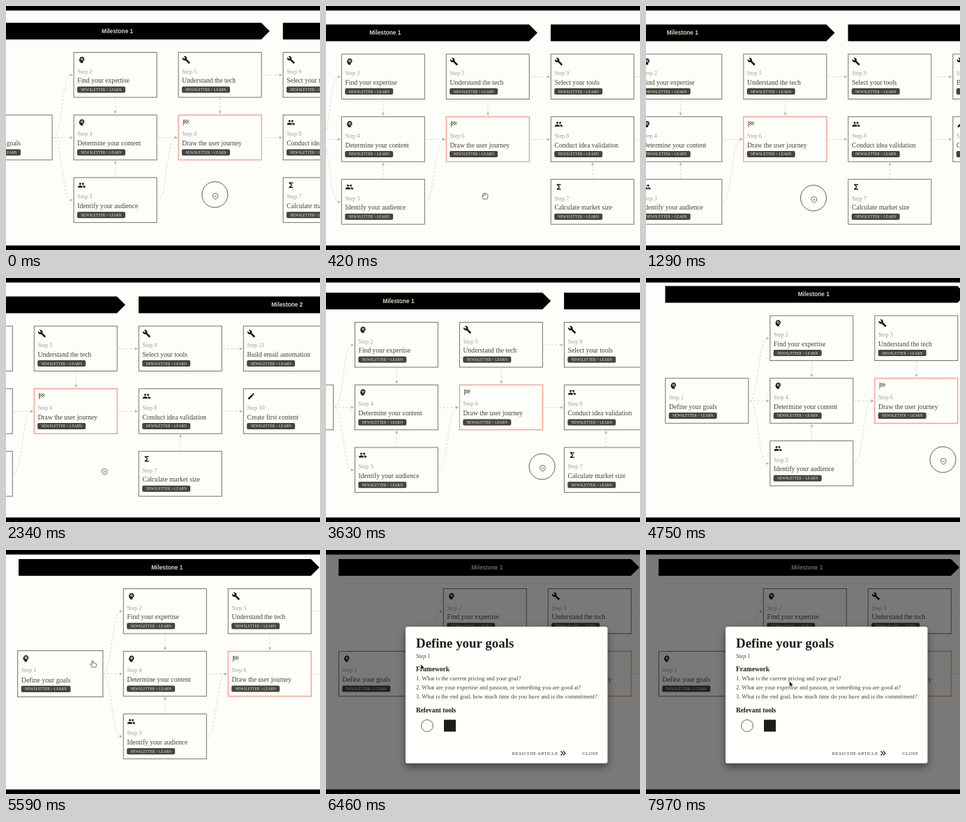
Animation of 450 by 350 pixels, one loop 8000 ms. Source, as an HTML page:

```html
<!DOCTYPE html>
<html lang="en">
<head>
<meta charset="utf-8">
<title>Roadmap</title>
<style>
  html, body { margin: 0; width: 100%; height: 100%; overflow: hidden; background: #fdfdf9; }
  svg { display: block; width: 450px; height: 350px; }
  text { font-family: "Liberation Serif", "Times New Roman", serif; fill: #44443c; white-space: pre; }
  .sans { font: bold 8.3px "Liberation Sans", Arial, sans-serif; fill: #d6d6cc; text-anchor: middle; }
  .step { font-size: 8.3px; fill: #a0a092; }
  .name { font-size: 9.6px; }
  .tag { font-size: 5.35px; fill: #e6e6de; }
  .bold { font-weight: bold; font-size: 9.5px; fill: #1c1c18; }
  .title { font-size: 18.9px; }
  .sub { font-size: 8.3px; font-style: italic; }
  .list { font-size: 8.42px; }
  .action { font-size: 7.15px; }
  .edge { fill: none; stroke: #cfcfba; stroke-width: .8; stroke-dasharray: 3 2.5; }
  .head { fill: #b8b8a0; }
  .line { fill: none; stroke: #1c1c18; }
  .sheet { fill: #fffffc; filter: drop-shadow(0 5px 6px rgba(0, 0, 0, .45)); }
  .hand { fill: #fdfdf9; stroke: #4a4a44; stroke-width: .8; stroke-linejoin: round; }
</style>
</head>
<body>
<svg id="stage" viewBox="0 0 450 350"></svg>
<script>
const DURATION = 8000;
const PAPER = '#fdfdf9', INK = '#1c1c18';

const shape = (d, fill = INK) => `<path d="${d}" fill="${fill}"/>`;
const label = (cls, x, y, s) => `<text class="${cls}" x="${x}" y="${y}">${s}</text>`;

// Icons on a 24 unit grid
const icons = {
  mind: shape('M13 3C9.2 3 6.2 6 6 9.7l-1.9 2.5c-.3.3 0 .8.4.8H6v3c0 1.1.9 2 2 2h1v3h7v-4.7c2.4-1.1 4-3.5 4-6.3 0-3.9-3.1-7-7-7z') +
    `<circle cx="13" cy="10" r="2.7" fill="none" stroke="${PAPER}" stroke-width="2"/>`,
  wrench: shape('M22.7 19l-9.1-9.1c.9-2.3.4-5-1.5-6.9-2-2-5-2.4-7.4-1.3L9 6 6 9 1.6 4.7C.4 7.1.9 10.1 2.9 12.1c1.9 1.9 4.6 2.4 6.9 1.5l9.1 9.1c.4.4 1 .4 1.4 0l2.3-2.3c.5-.4.5-1.1.1-1.4z'),
  people: shape('M16 11a3 3 0 1 0 0-6 3 3 0 0 0 0 6zM8 11a3 3 0 1 0 0-6 3 3 0 0 0 0 6zM8 13c-2.3 0-7 1.2-7 3.5V19h14v-2.5c0-2.3-4.7-3.5-7-3.5zM16 13l-1 .1c1.2.8 2 1.9 2 3.4V19h6v-2.5c0-2.3-4.7-3.5-7-3.5z'),
  sum: shape('M18 4H6v2l6.5 6L6 18v2h12v-3h-7l5-5-5-5h7z'),
  pencil: shape('M3 17.25V21h3.75L17.8 9.9l-3.7-3.7zM20.7 7c.4-.4.4-1 0-1.4l-2.3-2.3c-.4-.4-1-.4-1.4 0l-1.9 1.8 3.8 3.8z'),
  flag: shape('M3 4h1.6v17H3zM5 5h3v3H5zM12 5h3v3h-3zM8 8h4v3H8zM15 8h4v3h-4zM5 11h3v3H5zM12 11h3v3h-3z', '#55554e') +
    '<path d="M4 4.5h15.5v10H4" fill="none" stroke="#88887e"/>'
};

const cards = [
  [1, 0, 1, 'mind', 'Define your goals'],
  [2, 1, 0, 'mind', 'Find your expertise'],
  [4, 1, 1, 'mind', 'Determine your content'],
  [3, 1, 2, 'people', 'Identify your audience'],
  [5, 2, 0, 'wrench', 'Understand the tech'],
  [6, 2, 1, 'flag', 'Draw the user journey'],
  [9, 3, 0, 'wrench', 'Select your tools'],
  [8, 3, 1, 'people', 'Conduct idea validation'],
  [7, 3, 2, 'sum', 'Calculate market size'],
  [11, 4, 0, 'wrench', 'Build email automation'],
  [10, 4, 1, 'pencil', 'Create first content']
];
const colX = col => 18 + 150 * col;
const rowY = row => 55 + 89.8 * row;

function card([step, col, row, icon, name]) {
  return `<g transform="translate(${colX(col)} ${rowY(row)})"><g id="card${step}">
    <rect x=".3" y=".5" width="119" height="64.5" fill="${PAPER}" stroke="${step === 6 ? '#f4806a' : '#74746c'}"/>
    <g transform="translate(5.5 5.3) scale(.5)">${icons[icon]}</g>
    ${label('step', 5.5, 30.6, 'Step ' + step)}
    ${label('name', 5.5, 44.4, name)}
    <rect x="5.2" y="49.6" width="69" height="9" rx="2" fill="#45453e"/>
    ${label('tag', 10.4, 56, 'NEWSLETTER &gt; LEARN')}
  </g></g>`;
}

// Edge between neighbouring columns
function across(col, from, to) {
  const x = colX(col) + 121, end = colX(col + 1) - 4;
  const a = rowY(from) + 33, b = rowY(to) + 33, mid = (x + end) / 2;
  return `<path class="edge" d="M${x} ${a}C${mid} ${a} ${mid} ${b} ${end} ${b}"/>
    <path class="head" d="M${end - 1} ${b - 2}l4 2-4 2z"/>`;
}

// Edge between neighbouring rows
function along(col, from, to) {
  const x = colX(col) + 60, dir = to > from ? 1 : -1;
  const a = rowY(from) + (dir > 0 ? 66 : 0), b = rowY(to) + (dir > 0 ? -4 : 69);
  return `<path class="edge" d="M${x} ${a}V${b}"/>
    <path class="head" d="M${x - 2} ${b - dir}l2 ${4 * dir} 2 ${-4 * dir}z"/>`;
}

const milestone = n => {
  const x = colX(3 * (n - 1));
  return `<path d="M${x} 13h419l12 12-12 12H${x}z"/>` + label('sans', x + 212.8, 27.7, 'Milestone ' + n);
};

const edges = [
  across(0, 1, 0), across(0, 1, 1), across(0, 1, 2),
  across(1, 1, 1), across(1, 2, 1),
  across(2, 0, 0), across(2, 1, 1), across(3, 0, 0), across(3, 1, 1),
  along(1, 0, 1), along(1, 2, 1), along(2, 0, 1), along(3, 2, 1)
];

const questions = [
  'What is the current pricing and your goal?',
  'What are your expertise and passion, or something you are good at?',
  'What is the end goal, how much time do you have and is the commitment?'
];

const modal = `
  <rect class="sheet" x="114" y="110" width="289.5" height="196" rx="3"/>
  ${label('bold title', 129, 139.5, 'Define your goals')}
  ${label('sub', 129, 155, 'Step 1')}
  ${label('bold', 129, 174, 'Framework')}
  ${questions.map((q, i) => label('list', 129, 187 + 13.2 * i, `${i + 1}. ${q}`)).join('')}
  ${label('bold', 129, 233, 'Relevant tools')}
  <circle cx="145" cy="252" r="8.5" fill="#fffffc" stroke="#55554c" stroke-width=".9"/>
  <rect x="169" y="243.5" width="17" height="17" fill="${INK}"/>
  ${label('action', 266.5, 294, 'READ THE ARTICLE')}
  <path class="line" stroke-width="1.2" d="M336.5 288.5l3 3-3 3m3.5-6l3 3-3 3"/>
  ${label('action', 367.5, 294, 'CLOSE')}`;

const cursors = `
  <g id="closed" class="hand"><path d="M-3.5 1.5C-4.5-.5-3-1-2.5-.5-3-3-.8-3.2-.5-2.2 0-3.5 1.5-3.2 1.7-2 3-2.7 4.3-1.5 4 .5 4 4 2.5 5.5.5 5.5S-2.5 4-3.5 1.5z"/><path d="M-.5.5v2M1.3.5v2"/></g>
  <g id="open" class="hand"><path d="M-2.5 5.5C-3.5 4-5 2-4.5 1.2S-3 .8-2.6 1.8L-3.2-1.5c0-1.2 1.3-1.2 1.6-.2C-1.7-3.5 0-3.5.2-2.2.5-3.4 2-3 2.1-1.7 3.5-2.3 4.3-1.3 4 .5c0 2-.5 3.5-1.2 5z"/><path d="M-1.2-1v1.5M.5-1.5v2"/></g>
  <g id="pointer" class="hand"><path d="M-2 8C-3 6-4.5 4.5-4 3.8s1.6 0 2.2.8V-.5c0-1.3 1.7-1.3 1.7 0V2.3C.3 1.7 1.5 1.8 1.7 2.6c.7-.5 1.6-.2 1.8.5.8-.2 1.5.3 1.4 1.2C4.9 6 4.3 7 4 8z"/></g>
  <g id="arrow"><path d="M0 0v8l1.9-1.7 1.4 3 1.3-.6-1.4-2.9h2.5z" fill="#111" stroke="#fffffc" stroke-width=".5"/></g>`;

const $ = id => document.getElementById(id);
$('stage').innerHTML = `
  <rect width="450" height="350" fill="${PAPER}"/>
  <g id="board">${edges.join('')}${milestone(1)}${milestone(2)}${cards.map(card).join('')}</g>
  <rect id="shade" y="6" width="450" height="338"/>
  <path d="M0 0h450v6.5H0zM0 343.5h450v6.5H0z"/>
  <g id="modal">${modal}</g>
  <circle id="press" fill="none" stroke="#5c5c55"/>
  <g id="cursor">${cursors}</g>`;

const el = Object.fromEntries(['board', 'card1', 'shade', 'modal', 'press', 'cursor', 'closed', 'open', 'pointer', 'arrow']
  .map(id => [id, $(id)]));

const clamp = v => Math.min(1, Math.max(0, v));
const ramp = (t, a, b) => { const u = clamp((t - a) / (b - a)); return u * u * (3 - 2 * u); };
const pulse = (t, a, b, fade = 90) => ramp(t, a, a + fade) * (1 - ramp(t, b, b + fade));

// Monotone cubic through [time, x, y] keys
function track(keys) {
  const slope = (i, k) => (keys[i + 1][k] - keys[i][k]) / (keys[i + 1][0] - keys[i][0]);
  const last = keys.length - 1;
  const tangent = (i, k) => {
    if (i === 0) return slope(0, k);
    if (i === last) return 0;
    const a = slope(i - 1, k), b = slope(i, k);
    return a * b > 0 ? 2 * a * b / (a + b) : 0;
  };
  return t => {
    if (t >= keys[last][0]) return keys[last].slice(1);
    let i = 0;
    while (t >= keys[i + 1][0]) i++;
    const h = keys[i + 1][0] - keys[i][0], u = (t - keys[i][0]) / h, v = 1 - u;
    return [1, 2].map(k =>
      v * v * (1 + 2 * u) * keys[i][k] + u * u * (3 - 2 * u) * keys[i + 1][k] +
      h * u * v * (v * tangent(i, k) - u * tangent(i + 1, k)));
  };
}

const pan = track([
  [0, -71, 11], [420, -146, 13.5], [1000, -146, 13.5], [1900, -278, 13.5], [2340, -278, 13.5],
  [3630, -127, 8], [4750, 9.5, -1.5], [4900, 9.5, -1.5], [5150, 0, 0]
]);
const mouse = track([
  [0, 299.5, 270.5], [420, 227.5, 270.5], [1000, 272.5, 275.5], [1900, 140.5, 275.5],
  [2340, 140.5, 275.5], [3630, 309.5, 270.5], [4750, 425.5, 260.5], [4900, 425.5, 260.5],
  [5500, 124.5, 159], [6300, 124.5, 159], [7000, 205, 187]
]);

const show = (node, on) => node.setAttribute('display', on ? 'inline' : 'none');
const move = (node, [x, y]) => node.setAttribute('transform', `translate(${x.toFixed(2)} ${y.toFixed(2)})`);

function render(t) {
  const at = mouse(t);
  move(el.board, pan(t));

  const grow = 1 + .027 * pulse(t, 5420, 5920, 120);
  el.card1.setAttribute('transform', `translate(60 32.75) scale(${grow}) translate(-60 -32.75)`);

  const fade = ramp(t, 5880, 6110);
  el.shade.setAttribute('opacity', .52 * fade);
  el.modal.setAttribute('opacity', fade);

  const press = Math.max(pulse(t, -200, 310), pulse(t, 1000, 1880), pulse(t, 2400, 4820), pulse(t, 5720, 5820));
  el.press.setAttribute('opacity', press);
  el.press.setAttribute('r', 14 + 4.5 * press);
  el.press.setAttribute('cx', at[0]);
  el.press.setAttribute('cy', at[1]);

  const kind = t >= 5950 ? 'arrow' : t >= 5420 ? 'pointer'
    : t < 380 || (t > 960 && t < 1950) || (t > 2300 && t < 4880) ? 'closed' : 'open';
  for (const k of ['closed', 'open', 'pointer', 'arrow']) show(el[k], k === kind);
  move(el.cursor, [at[0] + .5, at[1] + 1]);
}

function tick() {
  render(performance.now() % DURATION);
  requestAnimationFrame(tick);
}
tick();
</script>
</body>
</html>
```
